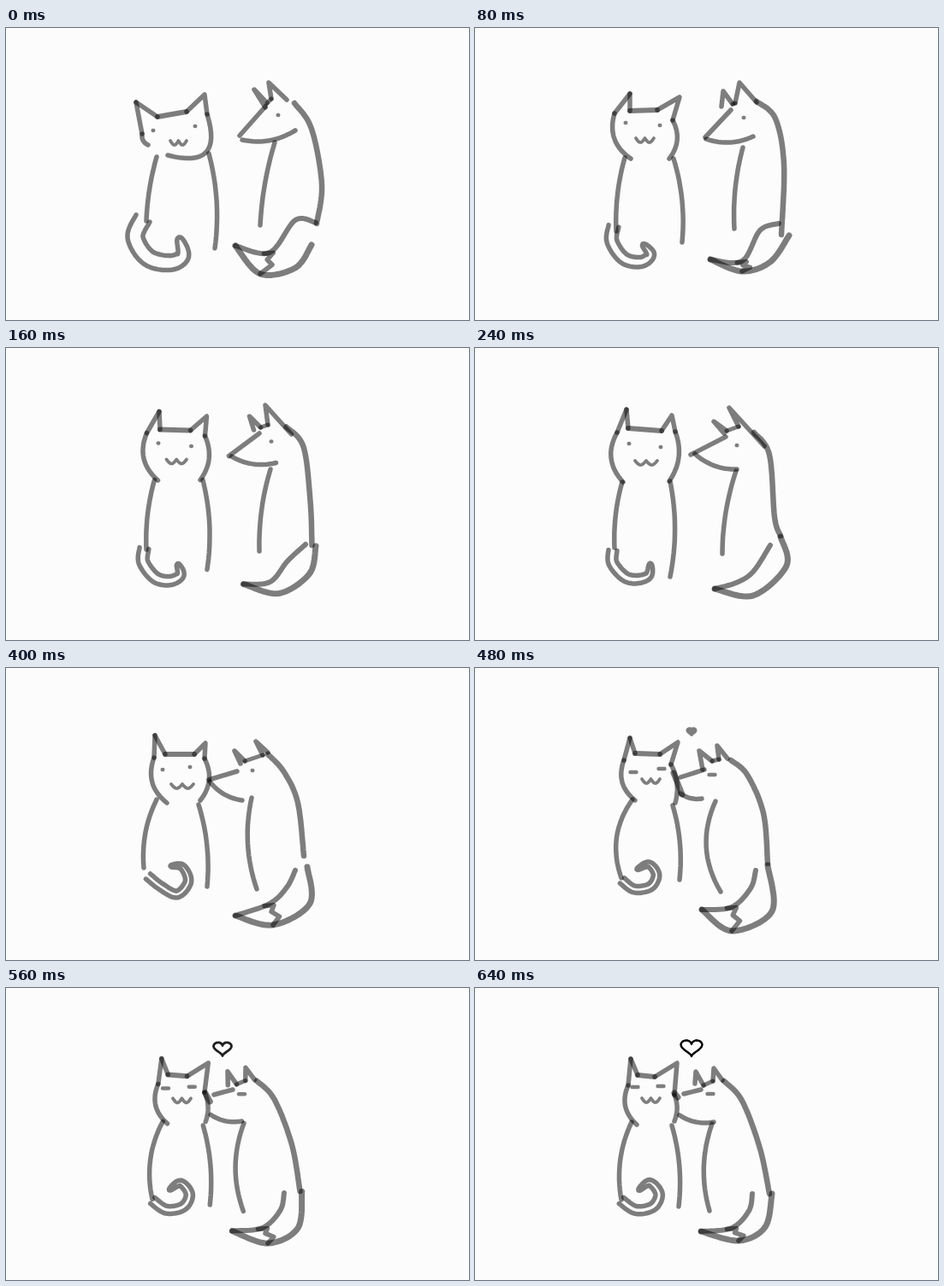
An HTML page that plays this animation: 541 by 342 pixels, repeating every 1120 ms.

```html
<!DOCTYPE html>
<html lang="en">
<head>
<meta charset="utf-8">
<title>Cat and fox</title>
<style>
  html, body { margin: 0; width: 100%; height: 100%; overflow: hidden; background: #fcfcfc; }
  svg { display: block; width: 541px; height: 342px; }
  path { fill: none; stroke: #000; stroke-linecap: round; stroke-linejoin: round; }
  /* Each drawing shows for 80 ms, the last one for 480 ms. */
  g {
    visibility: hidden;
    animation: flash 1120ms step-end infinite;
    animation-delay: calc(var(--turn) * 80ms);
  }
  g:last-child { animation-name: hold; }
  @keyframes flash { 0% { visibility: visible; } 7.142857%, 100% { visibility: hidden; } }
  @keyframes hold { 0% { visibility: visible; } 42.857142%, 100% { visibility: hidden; } }
</style>
</head>
<body>
<svg id="stage" viewBox="0 0 541 342"></svg>
<script>
// Numbers, lists and whole poses blend the same way.
function mix(a, b, t) {
  if (typeof a === 'number') return a + (b - a) * t;
  if (Array.isArray(a)) return a.map((v, i) => mix(v, b[i], t));
  return Object.fromEntries(Object.keys(a).map(k => [k, mix(a[k], b[k], t)]));
}

const range = (n, f) => Array.from({ length: n + 1 }, (_, i) => f(i / n));
const shift = ([x, y], dx, dy = 0) => [x + dx, y + dy];
const along = (line, t) => line[Math.round(t * (line.length - 1))];

// Catmull-Rom through a few points.
function curve(points) {
  const at = i => points[Math.max(0, Math.min(points.length - 1, i))];
  return points.slice(1).flatMap((_, i) => {
    const [a, b, c, d] = [at(i - 1), at(i), at(i + 1), at(i + 2)];
    return range(12, t => b.map((v, n) => v + 0.5 * t * (c[n] - a[n]
      + t * (2 * a[n] - 5 * v + 4 * c[n] - d[n]
      + t * (3 * (v - c[n]) + d[n] - a[n])))));
  });
}

// Arc from a to b; on a downward stroke a positive bend swells to the right.
function bow(a, b, bend) {
  const dx = b[0] - a[0], dy = b[1] - a[1];
  return range(16, t => {
    const swell = 4 * bend * t * (1 - t);
    return [a[0] + dx * t + dy * swell, a[1] + dy * t - dx * swell];
  });
}

// Outline of a band around a spine, open at the root and rounded at the tip.
function band(spine, fat) {
  const line = curve(spine), last = line.length - 1;
  const side = sign => line.map((p, i) => {
    const a = line[Math.max(0, i - 2)], b = line[Math.min(last, i + 2)];
    const size = sign * fat * Math.sqrt(1 - (i / last) ** 4) / Math.hypot(b[0] - a[0], b[1] - a[1]);
    return shift(p, (a[1] - b[1]) * size, (b[0] - a[0]) * size);
  });
  return [...side(1), ...side(-1).reverse()];
}

const smile = ([a, b]) => range(24, t =>
  shift(mix(a, b, t), 0, 5 * Math.abs(Math.sin(2 * Math.PI * t))));

const heartLine = (x, y, size) => range(40, t => {
  const a = 2 * Math.PI * t, c = k => Math.cos(k * a);
  return [x + 16 * size * Math.sin(a) ** 3,
    y - 0.83 * size * (13 * c(1) - 5 * c(2) - 2 * c(3) - c(4))];
});

const stroke = (points, width = 5.5, alpha = 0.5) =>
  `<path d="M${points.map(p => p.map(v => v.toFixed(1))).join('L')}" `
  + `stroke-width="${width}" stroke-opacity="${alpha}"/>`;

const eye = (p, wink) => stroke([shift(p, -wink), shift(p, wink)], 4.4);

function drawCat({ crown, jaw, eyes, mouth, body, curl, cheek, hunch, fat, wink }) {
  const [templeL, tipL, browL, browR, tipR, templeR] = crown;
  const [neckL, hipL, neckR, hipR] = body;
  return [
    stroke([templeL, tipL]),
    stroke([tipL, browL]),
    stroke([browL, browR], 6),
    stroke([browR, tipR, templeR]),
    stroke(bow(templeL, jaw[0], -0.18)),
    stroke(bow(templeR, jaw[1], cheek)),
    eye(eyes[0], wink),
    eye(eyes[1], wink),
    stroke(smile(mouth), 3.8),
    stroke(bow(neckL, hipL, -hunch)),
    stroke(bow(neckR, hipR, 0.05)),
    stroke(band(curl, fat))
  ];
}

function drawFox({ ears, muzzle, eyes, back, chest, tailTop, tailLow, hunch, wink, mark, press }) {
  const [brow, snout, chin, jaw] = muzzle;
  const top = curve(tailTop), low = curve([...tailLow, tailTop[3]]);
  const p = along(top, 0.73), q = along(low, 0.67);
  const patch = [p, shift(p, 11, -1), shift(mix(p, q, 0.3), 5), shift(mix(p, q, 0.55), 12), q];
  return [
    stroke(ears.slice(0, 3)),
    stroke(ears.slice(3)),
    stroke([ears[2], ears[3]], 5),
    stroke([brow, snout]),
    stroke(bow(chin, jaw, -0.1)),
    eye(eyes[2], wink),
    stroke(curve(back), 6.5),
    stroke(bow(chest[0], chest[1], -hunch)),
    stroke(top, 6),
    stroke(low, 7),
    mark === 1 ? stroke(patch) : '',
    press ? stroke(press, 7) : ''
  ];
}

const drawHeart = ({ heart }) => {
  if (!heart) return '';
  const [x, y, size, pen, ink] = heart;
  return stroke(heartLine(x, y, size), pen, ink);
};

// Strings of joints become lists of points.
const pose = joints => Object.fromEntries(Object.entries(joints).map(([name, v]) =>
  [name, typeof v === 'string' ? v.split(' ').map(p => p.split(',').map(Number)) : v]));

const apart = pose({
  crown: '159,124 152,87 177,104 211,98 232,78 235,101', jaw: '166,137 189,149',
  eyes: '172,120 221,115 318,102', mouth: '192,132 211,132',
  body: '176,151 164,226 237,147 244,258',
  curl: '160,223 151,245 166,269 192,275 207,266 202,245',
  ears: '303,93 290,72 305,88 310,83 307,64 328,84',
  muzzle: '303,92 273,126 276,131 338,120',
  back: '337,88 357,118 369,183 363,229', chest: '314,134 297,231',
  tailTop: '362,228 338,225 308,263 268,255', tailLow: '357,254 338,281 297,288',
  cheek: 0.45, hunch: 0.03, fat: 9, wink: 0.3, mark: 1
});

const turning = pose({
  crown: '163,100 181,77 181,97 213,96 239,81 231,108', jaw: '182,153 227,153',
  eyes: '176,111 216,114 314,105', mouth: '188,129 209,129',
  body: '175,152 165,238 232,153 242,251',
  curl: '162,232 160,250 174,270 194,274 205,265 196,253',
  ears: '288,92 290,74 301,89 304,88 309,64 329,87',
  muzzle: '299,96 269,128 270,130 325,127',
  back: '329,86 351,106 361,160 358,242', chest: '313,140 303,235',
  tailTop: '355,229 333,237 312,273 275,271', tailLow: '367,243 345,274 312,285',
  cheek: 0.16, hunch: 0.04, fat: 6, wink: 0.3, mark: 1
});

const leaning = pose({
  crown: '166,99 177,72 179,94 218,97 230,79 234,98', jaw: '173,157 227,156',
  eyes: '180,112 217,116 306,114', mouth: '187,132 213,132',
  body: '172,157 163,234 228,156 228,268',
  curl: '161,237 161,252 175,268 190,271 203,266 205,252',
  ears: '291,100 279,86 294,97 308,92 297,70 338,115',
  muzzle: '293,104 252,125 257,124 306,142',
  back: '326,99 344,125 350,198 357,220', chest: '305,144 289,241',
  tailTop: '345,231 325,262 305,275 280,282', tailLow: '357,221 364,255 325,290',
  cheek: 0.13, hunch: 0.04, fat: 5, wink: 0.3, mark: 0
});

const nuzzling = pose({
  crown: '173,105 174,79 186,101 220,101 233,88 232,106', jaw: '188,158 227,155',
  eyes: '183,119 215,116 288,120', mouth: '193,136 219,136',
  body: '176,154 161,234 225,160 235,256',
  curl: '166,244 181,256 200,265 213,250 206,233 192,232',
  ears: '274,112 267,97 279,109 300,102 292,86 306,99',
  muzzle: '270,121 237,131 238,133 276,155',
  back: '306,101 325,122 341,158 348,220', chest: '287,152 293,259',
  tailTop: '338,237 328,257 308,276 268,290', tailLow: '352,233 355,276 312,301',
  cheek: 0.16, hunch: 0.07, fat: 4, wink: 0.3, mark: 1
});

const touching = pose({
  crown: '174,108 181,82 187,100 216,101 237,87 229,113', jaw: '187,155 234,158',
  eyes: '185,122 218,118 277,125', mouth: '195,130 216,130',
  body: '184,154 171,246 231,161 239,248',
  curl: '172,249 186,259 205,256 212,242 203,230 189,236',
  ears: '266,119 262,97 277,109 285,107 283,91 295,106',
  muzzle: '268,119 240,128 240,147 265,153',
  back: '299,108 318,125 337,170 342,229', chest: '281,156 287,262',
  tailTop: '328,237 322,258 300,280 265,283', tailLow: '342,231 347,285 300,308',
  cheek: 0.1, hunch: 0.13, fat: 4, wink: 3.5, mark: 1,
  press: '232,123 242,148', heart: [253, 74, 0.28, 4, 0.5]
});

const kissing = pose({
  crown: '179,114 182,83 190,102 210,104 236,88 233,125', jaw: '189,160 233,156',
  eyes: '187,116 217,115 275,124', mouth: '195,129 216,129',
  body: '183,157 171,248 230,161 238,256',
  curl: '171,249 188,260 208,256 215,241 204,228 191,237',
  ears: '257,112 258,98 267,114 278,109 279,94 289,108',
  muzzle: '264,119 244,124 239,149 279,157',
  back: '291,109 312,132 333,188 344,241', chest: '277,159 274,261',
  tailTop: '324,241 320,261 300,281 264,285', tailLow: '347,241 339,280 308,296',
  cheek: 0.1, hunch: 0.08, fat: 4.5, wink: 3.5, mark: 1,
  press: '233,123 237,128', heart: [253, 69, 0.78, 2.4, 1]
});

const drawings = [
  apart, turning, mix(turning, leaning, 0.5), leaning,
  mix(leaning, nuzzling, 0.5), nuzzling,
  touching, mix(touching, kissing, 0.75), kissing
];

document.getElementById('stage').innerHTML = drawings.map((d, i) =>
  `<g style="--turn: ${i}">${[...drawCat(d), ...drawFox(d), drawHeart(d)].join('')}</g>`
).join('');
</script>
</body>
</html>
```
